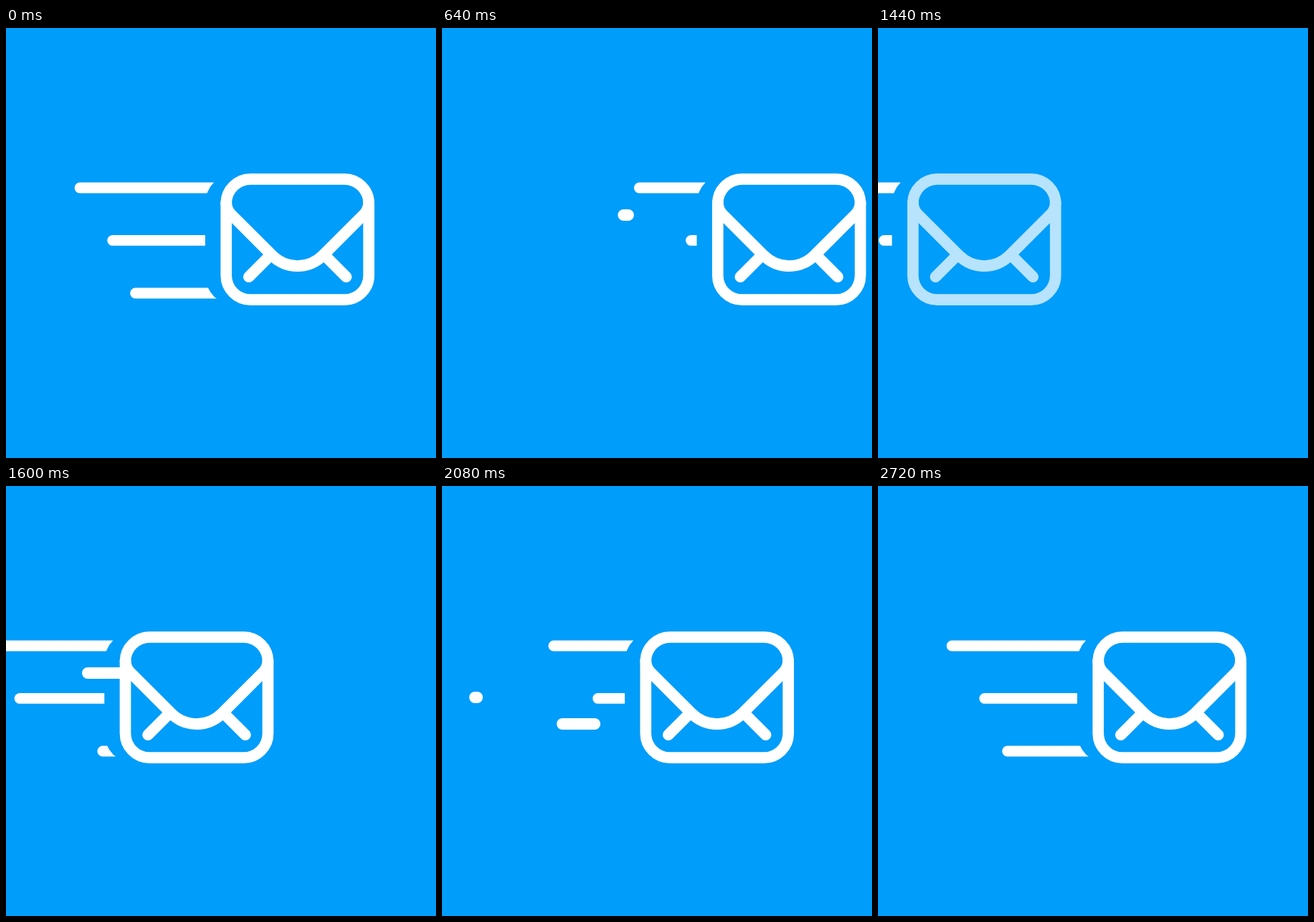
These frames come from a looping animation (600x600 px, 3040 ms). An HTML page:

```html
<!DOCTYPE html>
<html lang="en">
<head>
<meta charset="utf-8">
<title>Sending mail</title>
<style>
  html, body { margin: 0; width: 100%; height: 100%; overflow: hidden; background: #009dfa; }
  svg { display: block; width: 100vw; height: 100vh; }
  .ink { fill: none; stroke: #fff; stroke-width: 15.7; stroke-linecap: round; }
  .cover { fill: #009dfa; }
</style>
</head>
<body>
<svg viewBox="0 0 600 600">
  <g id="mail">
    <g id="far" class="ink"></g>
    <rect class="cover" x="278" y="203" width="236" height="184" rx="42"/>
    <g id="near" class="ink"></g>
    <rect class="cover" x="300" y="203.5" width="213.5" height="183" rx="41.5"/>
    <g id="envelope" class="ink">
      <rect x="307.25" y="210.85" width="199" height="168.3" rx="34"/>
      <path d="M307.25 243Q307.25 253.25 314 260L371.4 317.4A50 50 0 0 0 442.1 317.4L499.5 260Q506.25 253.25 506.25 243"/>
      <path d="M338.8 347.2L368 318M474.7 347.2L445.5 318"/>
    </g>
  </g>
</svg>
<script>
const LOOP = 3040, STEP = 40;
const $ = id => document.getElementById(id);
const mail = $('mail'), envelope = $('envelope');

const clamp = v => Math.min(1, Math.max(0, v));
const ease = u => (1 - Math.cos(Math.PI * clamp(u))) / 2;

// Smooth curve through [time, value] keys, flat at both ends
function curve(keys) {
  const rate = i => (keys[i + 1][1] - keys[i][1]) / (keys[i + 1][0] - keys[i][0]);
  const slope = keys.map((k, i) => {
    if (!i || i === keys.length - 1) return 0;
    const a = k[0] - keys[i - 1][0], b = keys[i + 1][0] - k[0];
    return (a * rate(i) + b * rate(i - 1)) / (a + b);
  });
  return t => {
    if (t <= keys[0][0]) return keys[0][1];
    const i = keys.findIndex(k => k[0] > t) - 1;
    if (i < 0) return keys[keys.length - 1][1];
    const [t0, v0] = keys[i], [t1, v1] = keys[i + 1];
    const h = t1 - t0, u = (t - t0) / h, w = 1 - u;
    return w * w * ((1 + 2 * u) * v0 + u * h * slope[i])
         + u * u * ((1 + 2 * w) * v1 - w * h * slope[i + 1]);
  };
}

const leave = curve([[0, 0], [320, 18], [560, 57.5], [640, 77.5], [960, 258], [1000, 302], [1040, 355]]);
const arrive = curve([[1200, -640], [1320, -400], [1440, -258.5], [1760, -77.5],
  [1880, -48.5], [2080, -23], [2440, -1], [2560, 0]]);

function addLine(layer, y, width) {
  const el = document.createElementNS('http://www.w3.org/2000/svg', 'line');
  el.setAttribute('y1', y);
  el.setAttribute('y2', y);
  el.style.strokeWidth = width;
  $(layer).append(el);
  return el;
}

const parts = [];
function add(layer, y, width, ends) {
  const el = addLine(layer, y, width);
  parts.push(t => {
    const [l, r] = ends(t);
    el.style.display = r - l > 0.2 ? '' : 'none';
    el.setAttribute('x1', l);
    el.setAttribute('x2', r);
  });
}

// A streak grows leftwards from `from` to `to`, then its tail follows
function streak(layer, y, width, from, to, head, headDur, tail, tailDur) {
  const at = (t, start, dur) => from + (to - from) * ease((t - start) / dur);
  add(layer, y, width, t => [at(t, head, headDur), at(t, tail, tailDur)]);
}

// A trail rests at full length, pulls in on leaving and grows back at the end
function trail(y, to, pull, pullDur, grow, growDur) {
  const from = 305;
  add('far', y, 14.8, t => {
    const p = t < 1200 ? 1 - ease((t - pull) / pullDur) : ease((t - grow) / growDur);
    return [from + (to - from) * p, from];
  });
}

trail(223, 103, 297, 714, 1755, 560);
trail(296.4, 148.7, 201, 640, 1805, 620);
trail(370, 180.6, 60, 620, 2090, 620);

streak('far', 223, 14.8, 305, 103, 1320, 280, 1605, 300);
streak('far', 296.4, 14.8, 305, 148.7, 1335, 320, 1770, 230);
streak('far', 370, 14.8, 305, 180.6, 1490, 340, 1800, 260);
streak('far', 295, 16, 103.5, 69, 1705, 160, 1837, 300);
streak('near', 261, 16, 315, 155, 380, 340, 460, 247);
streak('near', 261, 16, 315, 155, 1457, 340, 1740, 300);
streak('near', 332, 16, 315, 191, 1550, 340, 1880, 340);

function draw(t) {
  const shift = t < 1200 ? leave(t) : arrive(t);
  mail.setAttribute('transform', `translate(${shift} 0)`);
  mail.style.display = t >= 1000 && t <= 1320 ? 'none' : '';
  envelope.style.opacity = t < 1200 ? 1 : clamp((t - 1320) / 167);
  parts.forEach(part => part(t));
}

const begin = performance.now();
function tick() {
  const t = (performance.now() - begin) % LOOP;
  draw(Math.floor(t / STEP) * STEP);
  requestAnimationFrame(tick);
}
tick();
</script>
</body>
</html>
```
